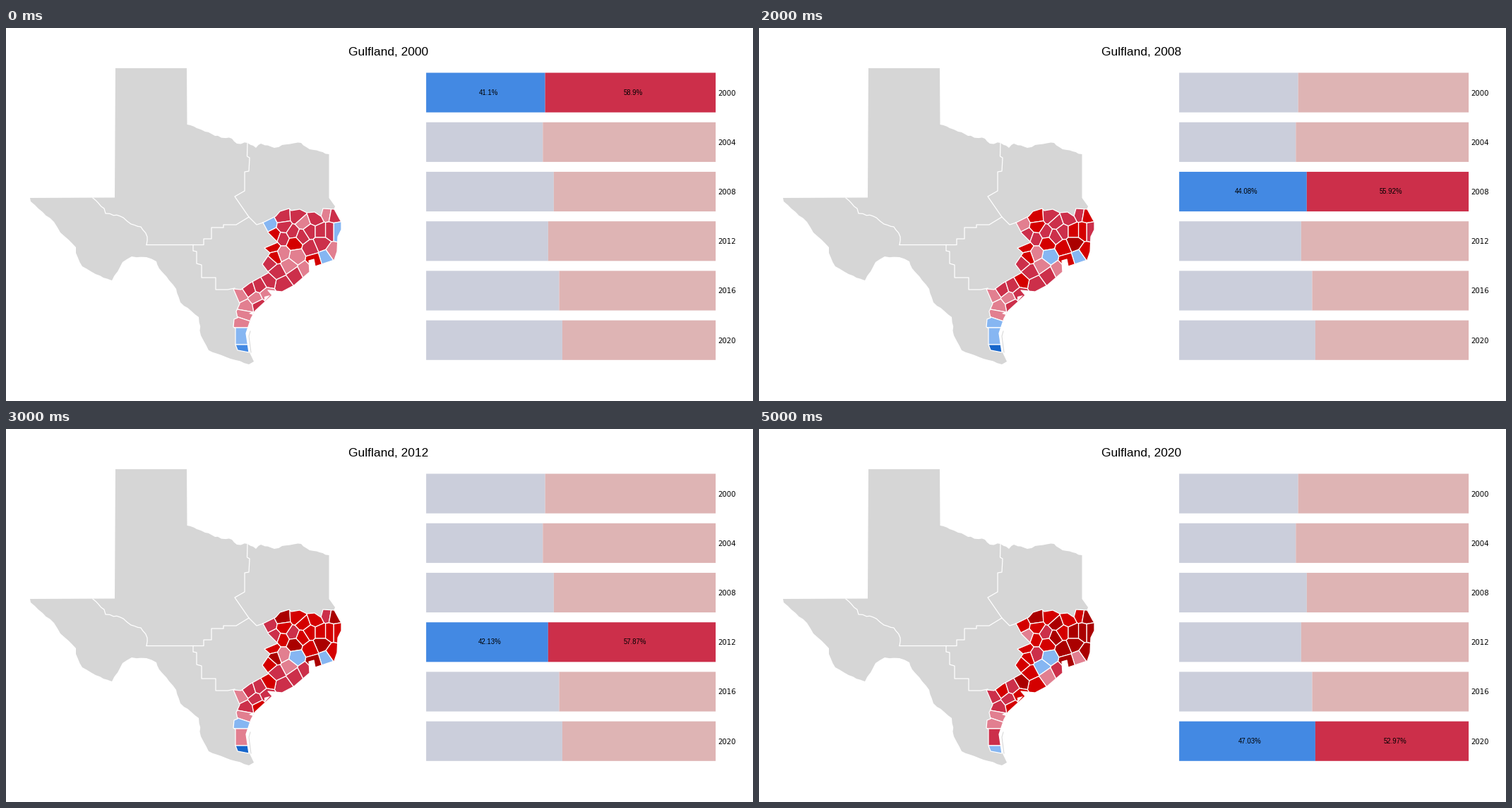
Write a matplotlib script that moves like this. It is 1058 px wide and 529 px high and loops after 6000 ms.

```python
import math
import random

import matplotlib.pyplot as plt
from matplotlib.animation import FuncAnimation
from matplotlib.patches import Polygon, Rectangle

W, H, DPI = 1058, 529, 105.8
YEARS = range(2000, 2021, 4)
SHARES = (41.1, 40.3, 44.08, 42.13, 45.95, 47.03)
GREY, BLUE, RED = "#d6d6d6", "#4389e3", "#cc2f4a"
PALE_BLUE, PALE_RED = "#cbcedb", "#deb4b4"
# a-c: blue wins, 1-4: red wins, from narrow to wide
SHADES = {"a": "#86b6f2", "b": BLUE, "c": "#1666cb",
          "1": "#e27f90", "2": RED, "3": "#d40000", "4": "#aa0000"}

fig = plt.figure(figsize=(W / DPI, H / DPI), dpi=DPI, facecolor="white")
ax = fig.add_axes([0, 0, 1, 1])
ax.set_xlim(0, W)
ax.set_ylim(H, 0)
ax.axis("off")
rng = random.Random(4)


def area(points, color, **style):
    style = {"ec": "none", "joinstyle": "round", **style}
    return ax.add_patch(Polygon(points, closed=True, fc=color, **style))


def line(points, color="white", width=0.85):
    ax.plot(*zip(*points), color=color, lw=width, zorder=4,
            solid_joinstyle="round")


def rough(points, size, step=5):
    """Break a few key points into a natural, slightly jagged bank."""
    path = []
    for (x0, y0), (x1, y1) in zip(points, points[1:]):
        count = max(1, round(math.dist((x0, y0), (x1, y1)) / step))
        path.append((x0, y0))
        for k in range(1, count):
            t = k / count
            path.append((x0 + (x1 - x0) * t + rng.uniform(-size, size),
                         y0 + (y1 - y0) * t + rng.uniform(-size, size)))
    return path + [points[-1]]


def nearer_part(polygon, site, other):
    """Cut off the part of a polygon that lies closer to another site."""
    def lead(p):
        return math.dist(p, other) ** 2 - math.dist(p, site) ** 2

    kept = []
    for p, q in zip(polygon, polygon[1:] + polygon[:1]):
        a, b = lead(p), lead(q)
        if a >= 0:
            kept.append(p)
        if a * b < 0:
            t = a / (a - b)
            kept.append((p[0] + (q[0] - p[0]) * t, p[1] + (q[1] - p[1]) * t))
    return kept


# State: straight borders, two rivers and the coast
panhandle = [(34, 241), (154, 240.5), (155, 57), (256, 57), (256.5, 137)]
north_river = [(256.5, 137), (276, 144), (296, 153), (320, 157), (327, 164),
               (342, 163), (354, 170), (361, 164), (380, 170), (391, 166),
               (418, 163), (430, 172), (457.5, 179)]
east = [(457.5, 241), (466, 253), (450, 290), (395, 335), (335, 395),
        (334, 440), (343, 456), (351, 473), (344, 477)]
south_river = [(344, 477), (318, 469), (287, 457), (276, 436), (273, 410),
               (247, 389), (241, 370), (217, 341), (213, 331), (199, 325),
               (178, 324), (165, 332), (150, 358), (127, 349), (108, 338),
               (99, 319), (99, 311), (77, 290), (68, 275), (35, 246)]
area(panhandle + rough(north_river, 1.2) + east + rough(south_river, 0.8, 7),
     GREY)

# Borders between the grey regions
line(rough([(123, 241), (139, 256), (141, 263), (162, 267), (177, 278),
            (191, 282), (200, 296), (199, 307.5)], 0.8))
line([(199, 307.5), (280, 307.5), (280, 299), (291, 299), (291, 283),
      (308, 283), (308, 279), (326, 279), (344, 268)])
line([(265, 307.5), (265, 316), (270, 317), (270, 334), (277, 336),
      (277, 354), (297, 354), (297, 371), (314, 371), (324, 369)])
line([(342, 163), (341.5, 182), (345, 184), (344, 203), (338, 204),
      (338, 231), (324, 239), (344, 268), (355, 279), (364, 276)])

# The coloured region is split into cells around the county centres
region = [(364, 276), (382, 267), (388, 260), (401, 256), (404, 259),
          (416, 257), (426, 262), (437, 261), (446, 267), (449, 256),
          (465, 257), (472, 270), (475, 275), (475, 286), (470, 296),
          (469, 317), (465, 329), (438, 338), (436, 328), (429, 330),
          (430, 346), (408, 365), (391, 374), (371, 372), (377, 379),
          (353, 401), (347, 412), (340, 433), (344, 460), (328, 457),
          (325, 449), (325, 426), (322, 424), (323, 413), (328, 411),
          (326, 402), (331, 391), (322, 370), (333, 371), (345, 362),
          (372, 347), (363, 335), (374, 319), (366, 312), (385, 304),
          (372, 291)]
centres = {
    "a11223": [(373, 278)], "322221": [(381, 294)], "233444": [(392, 268)],
    "222333": [(413, 267), (438, 270), (430, 288), (392, 298)],
    "223333": [(394, 282)], "122344": [(421, 276)], "112233": [(454, 262)],
    "223444": [(465, 264)], "a12334": [(469, 288)],
    "223344": [(459, 288), (446, 288)], "222334": [(419, 295)],
    "222222": [(406, 290)], "333433": [(408, 305)], "234444": [(446, 306)],
    "223334": [(432, 312)], "123344": [(463, 318)], "aaaa11": [(453, 325)],
    "333444": [(437, 330)], "11aaaa": [(411, 324)], "111122": [(392, 320)],
    "333333": [(378, 311)], "333443": [(381, 324)], "1111aa": [(401, 337)],
    "232333": [(373, 333), (358, 392)],
    "222233": [(384, 346), (392, 363), (344, 371)],
    "222221": [(410, 350)], "111222": [(424, 343)], "233344": [(372, 359)],
    "232232": [(360, 366)], "111112": [(332, 379)],
    "121222": [(354, 384), (340, 395.5)], "122223": [(369, 377)],
    "111111": [(338, 406.5)], "11aaa1": [(334, 418.5)],
    "aaa1a2": [(334, 431.5)], "baccba": [(334, 466.5)],
}
sites = [site for group in centres.values() for site in group]
outline = area(region, "white", zorder=2)
counties = []
for results, group in centres.items():
    for site in group:
        cell = [(0, 0), (W, 0), (W, H), (0, H)]
        for other in sites:
            if other != site:
                cell = nearer_part(cell, site, other)
        patch = area(cell, "white", ec="white", lw=0.85, zorder=3)
        patch.set_clip_path(outline)
        counties.append((patch, results))
line(region + region[:1])

# Bays, and the long island in the south
area([(366, 381), (374, 379), (366, 388)], "white", zorder=5)
area([(344, 405), (351, 401), (350, 407)], "white", zorder=5)
line([(346, 430), (344, 437), (347, 460)], GREY, 0.7)

# Six bars, each filling four fifths of its row
PITCH = 407.33 / 5.8
LEFT, SPAN = 595.1, 410


def bar(x, width, share, top):
    mid = top + 0.4 * PITCH
    rect = ax.add_patch(Rectangle((x, top), width, 0.8 * PITCH, lw=0,
                                  snap=False))
    label = ax.text(x + width / 2 + SPAN / 100, mid + 3.1, f"{share:.4g}%",
                    ha="center", size=6.55, family="Liberation Sans")
    return rect, label


rows = []
for i, (year, share) in enumerate(zip(YEARS, SHARES)):
    top = 63.48 + i * PITCH
    split = SPAN * share / 100
    rows.append((bar(LEFT, split, share, top),
                 bar(LEFT + split, SPAN - split, 100 - share, top)))
    ax.text(1008, top + 0.4 * PITCH, str(year), size=7, family="DejaVu Sans",
            va="center_baseline")

title = ax.text(541.5, 39, "", ha="center", size=11.85,
                family="Liberation Sans")


def update(step):
    title.set_text(f"Gulfland, {YEARS[step]}")
    for patch, results in counties:
        patch.set_facecolor(SHADES[results[step]])
    for i, row in enumerate(rows):
        active = i == step
        colors = (BLUE, RED) if active else (PALE_BLUE, PALE_RED)
        for (rect, label), color in zip(row, colors):
            rect.set_facecolor(color)
            label.set_visible(active)


anim = FuncAnimation(fig, update, frames=len(YEARS), interval=1000, repeat=True)
plt.show()
```
